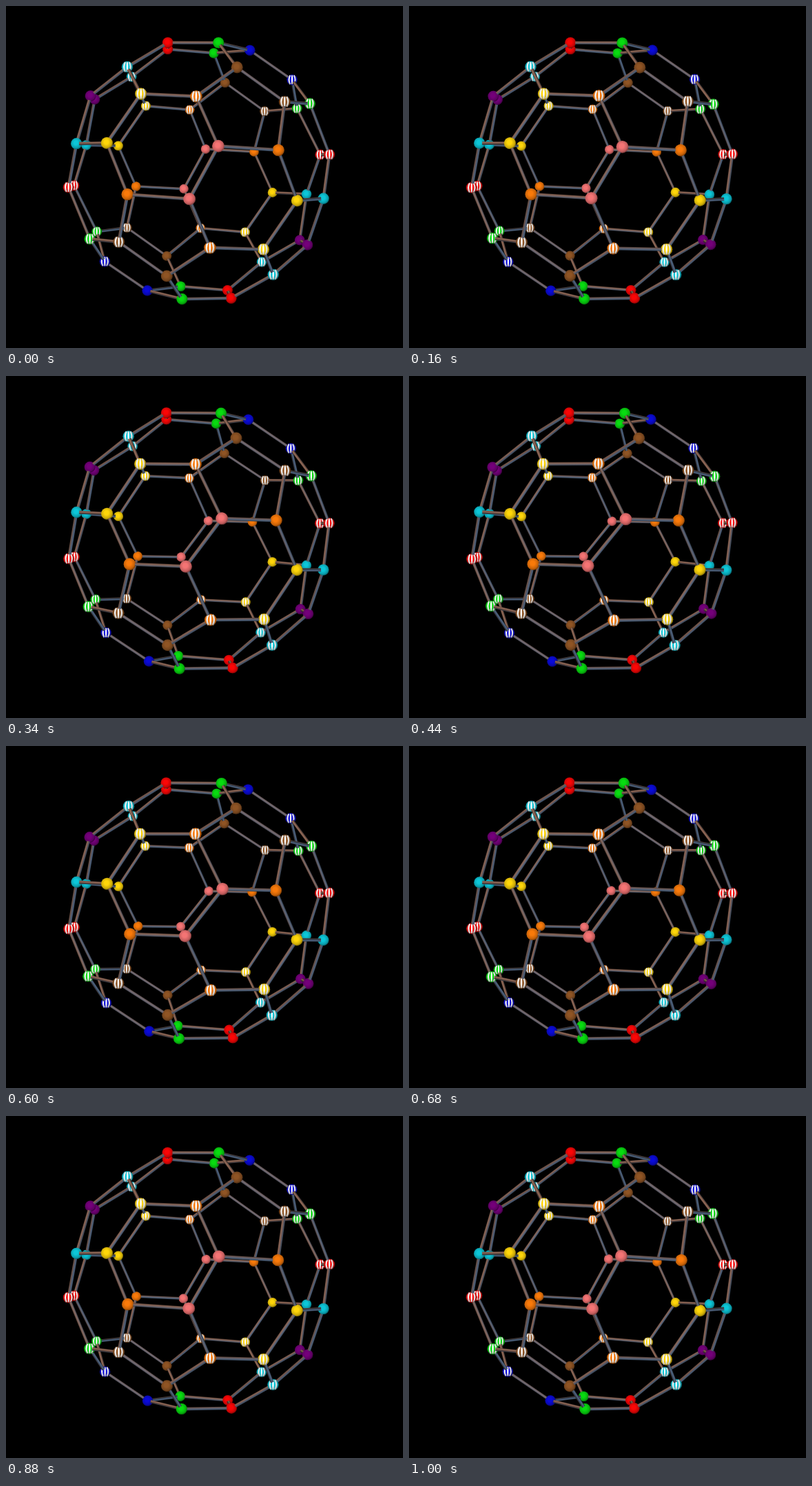
An HTML page that plays this animation: 576 by 495 pixels, repeating every 1.02 s.

```html
<!DOCTYPE html>
<html lang="en">
<head>
<meta charset="utf-8">
<title>Vibrating cage molecule</title>
<style>
  html, body { margin: 0; width: 100%; height: 100%; overflow: hidden; background: #000; }
  svg { display: block; }
</style>
</head>
<body>
<svg id="stage" width="576" height="495" viewBox="0 0 576 495">
  <defs id="defs">
    <radialGradient id="shade" cx=".45" cy=".43" r=".6">
      <stop offset=".3" stop-color="#000" stop-opacity="0"/>
      <stop offset=".75" stop-color="#000" stop-opacity=".2"/>
      <stop offset="1" stop-color="#000" stop-opacity=".55"/>
    </radialGradient>
  </defs>
</svg>
<script>
const STEP = 20, LOOP = 1020, PERIOD = 1000;
const BALL = 0.2, ROD = 0.115, MAX_BOND = 2.2;
const CENTER = { x: 279.5, y: 238 };
const FOCAL = 1325, EYE = 34.7;

// Warm light from the upper left, cool light from the lower right.
const LIGHTS = [
  { dir: [-0.6, -0.6, 0.53], color: [145, 105, 88] },
  { dir: [0.6, 0.6, 0.53], color: [78, 98, 125] }
];

// One atom per symmetry class: position, in-plane swing, colour,
// and the sign of x*y for which the ball is plain (0 = always plain).
const CLASSES = [
  [0, 0.977, 4.854, 0.092, 0, '#f47474', 0],
  [4.854, 0, 0.977, 0, 0.0316, '#74007a', 0],
  [0.977, 4.854, 0, -0.042, 0.008, '#0a0ad8', -1],
  [1.637, 1.988, 4.229, -0.0366, -0.0313, '#f97a0a', 1],
  [3.217, 1.012, 3.625, -0.0121, 0.0103, '#ffd60a', 1],
  [1.012, 3.625, 3.217, -0.0055, 0.0265, '#8f5424', -1],
  [4.229, 1.637, 1.988, 0.0147, -0.0269, '#0cc6d8', 1],
  [1.988, 4.229, 1.637, 0.0562, -0.0258, '#08dc10', -1],
  [3.625, 3.217, 1.012, -0.025, 0.0237, '#fa0606', -1]
];

const stage = document.getElementById('stage');
const defs = document.getElementById('defs');

function add(parent, tag, attrs) {
  const el = document.createElementNS('http://www.w3.org/2000/svg', tag);
  for (const key in attrs) el.setAttribute(key, attrs[key]);
  return parent.appendChild(el);
}

const signs = v => (v ? [1, -1] : [1]);
const dot = (a, b) => a.reduce((sum, v, i) => sum + v * b[i], 0);
const unit = a => a.map(v => v / Math.hypot(...a));
const mix = (a, b, k) => a.map((v, i) => v + (b[i] - v) * k);
const distance = (a, b) => Math.hypot(...a.map((v, i) => v - b[i]));

function buildAtoms() {
  const atoms = [];
  for (const [x, y, z, ux, uy, color, plain] of CLASSES)
    for (const sx of signs(x)) for (const sy of signs(y)) for (const sz of signs(z))
      atoms.push({
        rest: [sx * x, sy * y, sz * z],
        swing: [sy * ux, sx * uy],
        color, striped: plain !== 0 && sx * sy !== plain
      });
  return atoms;
}

// Turns molecule coordinates into view coordinates, z towards the viewer.
function view(atom, phase) {
  const x = atom.rest[0] + atom.swing[0] * phase;
  const y = atom.rest[1] + atom.swing[1] * phase;
  const z = atom.rest[2];
  const px = 0.8286 * x + 0.56 * y;
  const py = 0.56 * x - 0.8286 * y;
  return [px + 0.035 * z, py + 0.0137 * z, z - 0.035 * px - 0.0137 * py];
}

function project([x, y, z]) {
  const scale = FOCAL / (EYE - z);
  return { x: CENTER.x + x * scale, y: CENTER.y + y * scale, scale };
}

function lit(normal) {
  const rgb = [0, 1, 2].map(i => LIGHTS.reduce(
    (sum, light) => sum + light.color[i] * Math.max(0, dot(normal, light.dir)), 0));
  return `rgb(${rgb.map(Math.round)})`;
}

function makeBall({ color, striped }) {
  const ball = add(stage, 'g', {});
  add(ball, 'circle', { r: 1, fill: color });
  if (striped) {
    const d = [-0.6, 0, 0.6].map(x => `M${x * 0.6}-.85Q${x * 1.4} 0 ${x * 0.6} .85`).join('');
    add(ball, 'path', { d, fill: 'none', stroke: '#fff', 'stroke-width': 0.28 });
  }
  add(ball, 'circle', { r: 1, fill: 'url(#shade)' });
  return ball;
}

// Shades a rod as a lit cylinder: the normal turns across its width.
function makeRod({ a, b }, index) {
  const axis = unit(b.pos.map((v, i) => v - a.pos[i]));
  const side = unit([-axis[1], axis[0], 0]);
  const front = unit([0, 0, 1].map((v, i) => v - axis[2] * axis[i]));
  const id = 'rod' + index;
  const gradient = add(defs, 'linearGradient', { id, x1: 0, y1: 0, x2: 0, y2: 1 });
  for (let offset = 0; offset <= 1; offset += 0.25) {
    const v = offset * 2 - 1, w = Math.sqrt(1 - v * v);
    const normal = front.map((f, i) => f * w + side[i] * v);
    add(gradient, 'stop', { offset, 'stop-color': lit(normal) });
  }
  return add(stage, 'path', { d: 'M0-.5H1V.5H0z', fill: `url(#${id})` });
}

const atoms = buildAtoms();
for (const atom of atoms) atom.pos = view(atom, 0);
const parts = atoms.map(atom => ({ atom, depth: atom.pos[2] }));
atoms.forEach((a, i) => atoms.slice(i + 1).forEach(b => {
  if (distance(a.rest, b.rest) < MAX_BOND)
    parts.push({ a, b, depth: (a.pos[2] + b.pos[2]) / 2 });
}));
parts.sort((p, q) => p.depth - q.depth);
parts.forEach((part, i) => {
  part.el = part.atom ? makeBall(part.atom) : makeRod(part, i);
});

function placeBall({ atom, el }) {
  const p = project(atom.pos);
  el.setAttribute('transform', `translate(${p.x} ${p.y}) scale(${p.scale * BALL})`);
}

// Rods start and end just inside the ball surfaces.
function placeRod({ a, b, el }) {
  const trim = BALL * 0.93 / distance(a.pos, b.pos);
  const p = project(mix(a.pos, b.pos, trim));
  const q = project(mix(b.pos, a.pos, trim));
  const dx = q.x - p.x, dy = q.y - p.y;
  const k = ROD * (p.scale + q.scale) / 2 / Math.hypot(dx, dy);
  el.setAttribute('transform', `matrix(${dx} ${dy} ${-dy * k} ${dx * k} ${p.x} ${p.y})`);
}

function render(now) {
  const t = Math.floor((now % LOOP) / STEP) * STEP;
  const phase = -Math.cos(2 * Math.PI * t / PERIOD);
  for (const atom of atoms) atom.pos = view(atom, phase);
  for (const part of parts) (part.atom ? placeBall : placeRod)(part);
}

function tick() {
  render(performance.now());
  requestAnimationFrame(tick);
}
tick();
</script>
</body>
</html>
```
